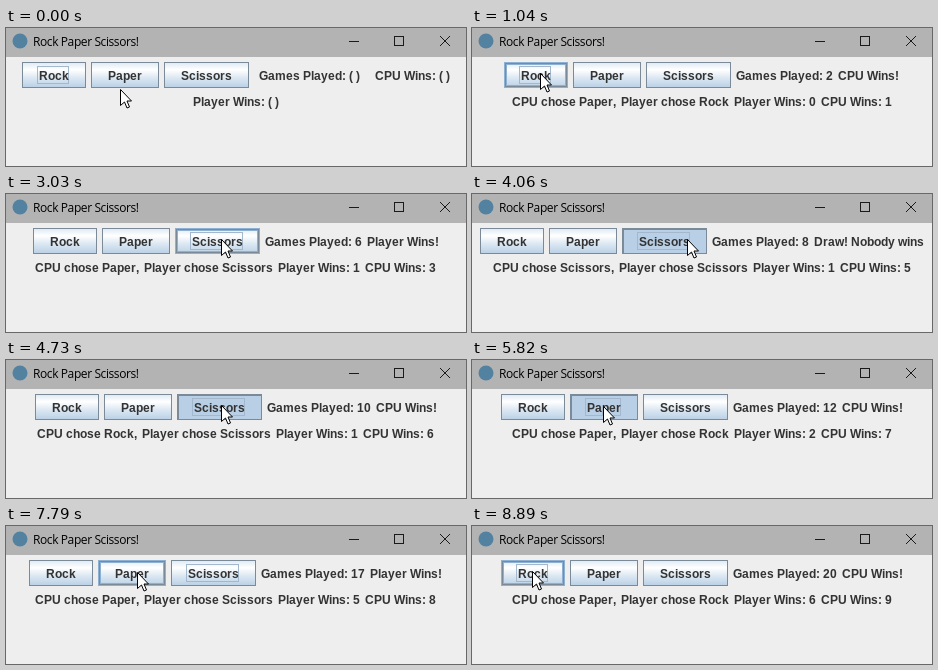
Recreate the animation shown at these times as an HTML page with a canvas. Size 460 px wide and 138 px high, loop 8910 ms.

```html
<!DOCTYPE html>
<html lang="en">
<head>
<meta charset="utf-8">
<title>Rock Paper Scissors!</title>
<style>
  html, body { margin: 0; width: 100%; height: 100%; overflow: hidden; background: #eee; }
  canvas { display: block; }
</style>
</head>
<body>
<canvas id="stage" width="460" height="138"></canvas>
<script>
const LOOP = 8910, WIDTH = 460, HEIGHT = 138, GAP = 5;
const TOP = 34, BUTTON_H = 26, PAD = 17;
const HOLD = 90, TRAVEL = 300, REST = 190;
const ROCK = 0, PAPER = 1, SCISSORS = 2;
const NAMES = ['Rock', 'Paper', 'Scissors'];
const RESULTS = ['Draw! Nobody wins', 'Player Wins!', 'CPU Wins!'];
const LABEL_FONT = 'bold 12px "Liberation Sans", Arial, sans-serif';
const TITLE_FONT = '12px "Open Sans", sans-serif';
const BORDER = '#7a8a99', GLOW = '#8db0d3', INK = '#1a1a1a';

// The player visits a button and clicks it at a steady beat, once per CPU choice.
const visit = (button, start, cpu, beat = 0) => ({ button, start, cpu, beat });
const VISITS = [
  visit(ROCK, 420, 'SP', 370),
  visit(PAPER, 1470, 'RPR', 380),
  visit(SCISSORS, 2920, 'PPSPRP', 362),
  visit(ROCK, 5230, 'P'),
  visit(PAPER, 5820, 'SSP', 265),
  visit(SCISSORS, 7090, 'PP', 250),
  visit(PAPER, 7920, 'S'),
  visit(ROCK, 8380, 'RP', 220)
];
const ROUNDS = VISITS.flatMap(({ button, start, cpu, beat }) =>
  [...cpu].map((letter, i) => ({ player: button, cpu: 'RPS'.indexOf(letter), down: start + i * beat })));

const HOME = { x: 114, y: 61 };
const AIM = [{ x: 60, y: 45 }, { x: 131, y: 46 }, { x: 215, y: 45 }];

const ctx = document.getElementById('stage').getContext('2d');
const advances = {};

function advance(ch) {
  if (!(ch in advances)) {
    ctx.font = LABEL_FONT;
    advances[ch] = Math.round(ctx.measureText(ch).width);
  }
  return advances[ch];
}

const textWidth = text => [...text].reduce((sum, ch) => sum + advance(ch), 0);

// Labels use whole-pixel glyph advances.
function drawLabel(text, x, baseline) {
  ctx.font = LABEL_FONT;
  ctx.fillStyle = '#333';
  for (const ch of text) {
    ctx.fillText(ch, x, baseline);
    x += advance(ch);
  }
}

function frame(x, y, w, h, color) {
  ctx.strokeStyle = color;
  ctx.lineWidth = 1;
  ctx.strokeRect(x + 0.5, y + 0.5, w - 1, h - 1);
}

// Left edges of a centred row of items
function flow(widths) {
  const total = widths.reduce((a, b) => a + b, 0) + GAP * (widths.length - 1);
  let x = Math.floor((WIDTH - total) / 2);
  return widths.map(w => {
    const left = x;
    x += w + GAP;
    return left;
  });
}

function drawLabels(texts, lefts, baseline) {
  texts.forEach((text, i) => drawLabel(text, lefts[i], baseline));
}

function buttonFill() {
  const fill = ctx.createLinearGradient(0, TOP, 0, TOP + BUTTON_H);
  fill.addColorStop(0, '#dde8f3');
  fill.addColorStop(0.3, '#fff');
  fill.addColorStop(0.6, '#dde8f3');
  fill.addColorStop(1, '#b8cfe5');
  return fill;
}

function drawButton(name, x, w, { pressed, hover, focus }) {
  ctx.fillStyle = pressed ? '#b8cfe5' : buttonFill();
  ctx.fillRect(x, TOP, w, BUTTON_H);
  const ring = (inset, color) => frame(x + inset, TOP + inset, w - 2 * inset, BUTTON_H - 2 * inset, color);
  if (pressed) {
    ring(0, BORDER);
    ctx.fillStyle = BORDER;
    ctx.fillRect(x, TOP, w, 2);
    ctx.fillRect(x, TOP, 2, BUTTON_H);
  } else if (hover) {
    [GLOW, BORDER, GLOW].forEach((color, inset) => ring(inset, color));
  } else {
    ring(0, BORDER);
  }
  if (focus) frame(x + PAD - 2, TOP + 4, w - 2 * PAD + 2, 18, '#a3b8cc');
  drawLabel(name, x + PAD, 52);
}

function drawTitleBar() {
  ctx.fillStyle = '#b3b3b3';
  ctx.fillRect(0, 0, WIDTH, 29);
  ctx.fillStyle = '#5382a1';
  ctx.beginPath();
  ctx.arc(14, 13, 7.5, 0, 2 * Math.PI);
  ctx.fill();

  ctx.font = TITLE_FONT;
  ctx.letterSpacing = '-0.4px';
  ctx.fillStyle = '#000';
  ctx.fillText('Rock Paper Scissors!', 27, 18);
  ctx.letterSpacing = '0px';

  ctx.fillStyle = INK;
  ctx.fillRect(343, 13, 10, 1);
  frame(388, 8, 10, 10, INK);
  ctx.beginPath();
  ctx.moveTo(434, 8);
  ctx.lineTo(444, 18);
  ctx.moveTo(444, 8);
  ctx.lineTo(434, 18);
  ctx.stroke();
}

// The pointer arrives a short rest before each visit's first click.
function pointerAt(t) {
  let { x, y } = HOME, free = 0;
  for (const { button, start, cpu, beat } of VISITS) {
    const arrive = start - REST;
    const leave = Math.max(free, arrive - TRAVEL);
    if (t < leave) break;
    const p = Math.min(1, (t - leave) / (arrive - leave));
    const eased = p * p * (3 - 2 * p);
    x += (AIM[button].x - x) * eased;
    y += (AIM[button].y - y) * eased;
    free = start + (cpu.length - 1) * beat + HOLD;
  }
  return { x: Math.round(x), y: Math.round(y) };
}

function drawPointer({ x, y }) {
  ctx.save();
  ctx.translate(x + 0.5, y + 0.5);
  const arrow = new Path2D('M0 0V16L4 12.5L6.5 18.5L9 17.5L6.5 11.5H11Z');
  ctx.fillStyle = '#fff';
  ctx.fill(arrow);
  ctx.strokeStyle = '#000';
  ctx.lineWidth = 1;
  ctx.stroke(arrow);
  ctx.restore();
}

function gameAt(t) {
  const game = {
    focus: ROCK,
    pressed: -1,
    first: ['', 'Games Played: ( )', '', '', 'CPU Wins: ( )'],
    second: ['Player Wins: ( )']
  };
  let playerScore = 0, cpuScore = 0;
  ROUNDS.forEach(({ player, cpu, down }, i) => {
    if (t < down) return;
    const held = t < down + HOLD;
    game.focus = player;
    game.pressed = held ? player : -1;
    if (held) return;
    const result = (player - cpu + 3) % 3;
    game.first = ['Games Played: ' + (i + 1), RESULTS[result]];
    game.second = [
      `CPU chose ${NAMES[cpu]},`, `Player chose ${NAMES[player]}`,
      'Player Wins: ' + playerScore, 'CPU Wins: ' + cpuScore
    ];
    // The scores are shown one round late and credited to the other side.
    if (result === 1) cpuScore++;
    if (result === 2) playerScore++;
  });
  return game;
}

function render(t) {
  const game = gameAt(t), pointer = pointerAt(t);
  ctx.fillStyle = '#eee';
  ctx.fillRect(0, 0, WIDTH, HEIGHT);
  drawTitleBar();

  const buttons = NAMES.map(name => textWidth(name) + 2 * PAD);
  const lefts = flow([...buttons, ...game.first.map(textWidth)]);
  NAMES.forEach((name, i) => {
    const x = lefts[i], w = buttons[i];
    drawButton(name, x, w, {
      focus: game.focus === i,
      pressed: game.pressed === i,
      hover: pointer.x >= x && pointer.x < x + w && pointer.y >= TOP && pointer.y < TOP + BUTTON_H
    });
  });
  drawLabels(game.first, lefts.slice(NAMES.length), 52);
  drawLabels(game.second, flow(game.second.map(textWidth)), 78);
  drawPointer(pointer);
}

const began = performance.now();
function tick() {
  render((performance.now() - began) % LOOP);
  requestAnimationFrame(tick);
}
tick();
</script>
</body>
</html>
```
